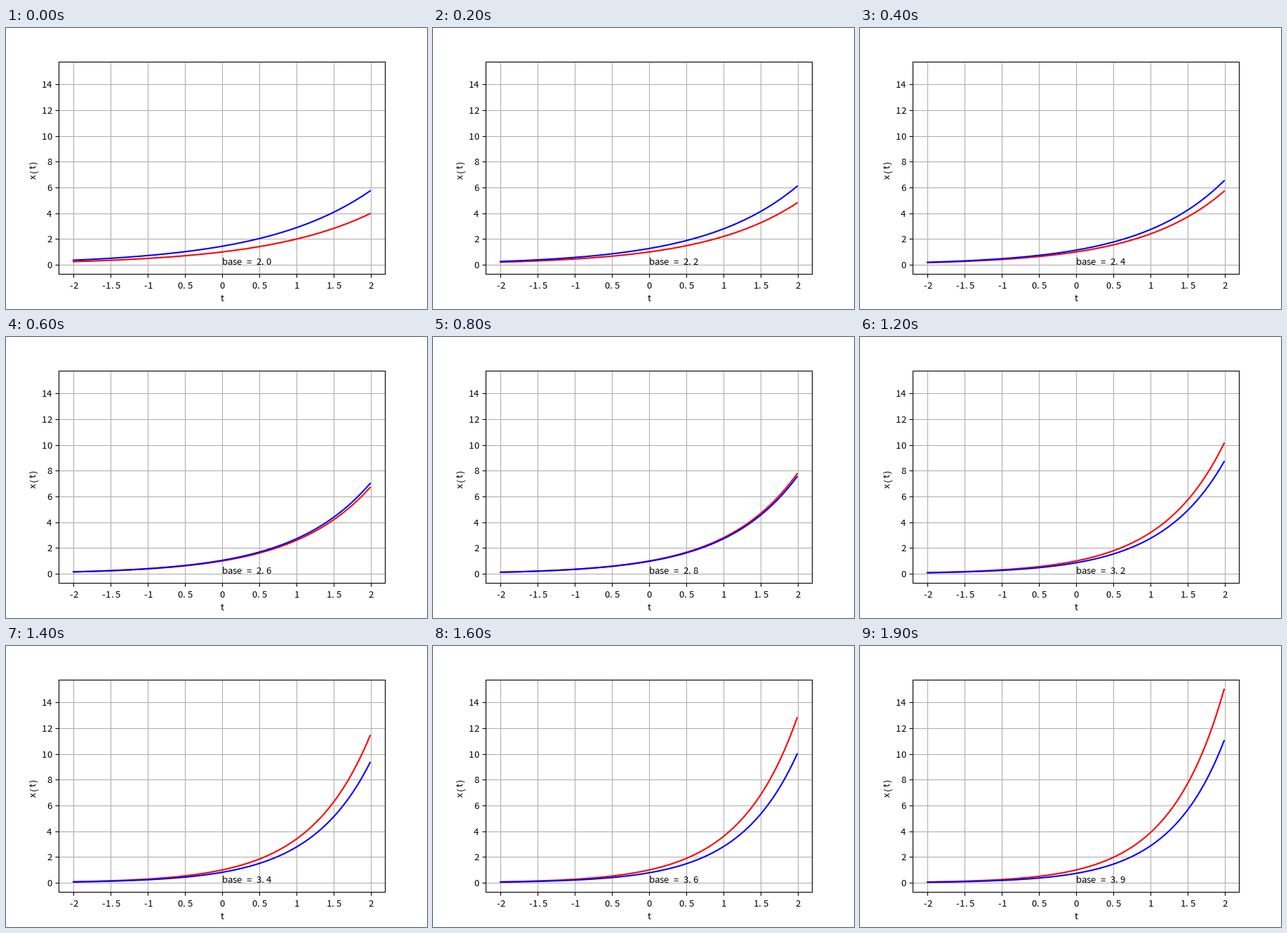
Write a matplotlib script that moves like this. It is 600 px wide and 400 px high and loops after 2000 ms.

```python
import numpy as np
import matplotlib.pyplot as plt
from matplotlib.animation import FuncAnimation

W, H, DPI = 600, 400, 100
FRAMES, INTERVAL = 20, 100
FONT, SIZE = "Noto Sans CJK JP", 9.5
PITCH = 6.94                      # half-width cell of a 10 pt font, in pixels
NUDGE = {".": -1.2, "(": 1.2, ")": -1.2}

fig = plt.figure(figsize=(W / DPI, H / DPI), dpi=DPI, facecolor="white")
ax = fig.add_axes([0.125, 0.125, 0.775, 0.755])

t = np.arange(-2, 2, 0.01)


def power(base):
    return base ** t


def integral(base):
    return base ** t / np.log(base)


def base_at(i):
    return 2 + 0.1 * i


def padded(lo, hi):
    pad = 0.05 * (hi - lo)
    return lo - pad, hi + pad


def mono(x, y, text, align=0.5, upright=False):
    """Set text on a half-width grid; x, y is the baseline anchor in pixels."""
    chars = []
    for k, ch in enumerate(text):
        step = (k + 0.5 - align * len(text)) * PITCH + NUDGE.get(ch, 0)
        px, py = (x, y - step) if upright else (x + step, y)
        chars.append(fig.text(px / W, 1 - py / H, ch, family=FONT, size=SIZE,
                              ha="center", va="baseline",
                              rotation=90 if upright else 0,
                              rotation_mode="anchor"))
    return chars


def to_pixel(x, y):
    px, py = ax.transData.transform((x, y))
    return px, H - py


last = base_at(FRAMES - 1)
ax.set_xlim(*padded(t[0], t[-1]))
ax.set_ylim(*padded(integral(last)[0], power(last)[-1]))
ax.set_xticks(np.arange(-2, 2.5, 0.5))
ax.set_yticks(range(0, 15, 2))
ax.tick_params(labelbottom=False, labelleft=False)
ax.grid(True)

x_names = ["-2", "-1.5", "-1", "0.5", "0", "0.5", "1", "1.5", "2"]
for tick, name in zip(ax.get_xticks(), x_names):
    mono(to_pixel(tick, 0)[0], 371, name)
for tick in ax.get_yticks():
    mono(65.3, to_pixel(0, tick)[1] + 5, str(int(tick)), align=1)
mono(308, 389, "t")
mono(43, 201, "x(t)", upright=True)

red, = ax.plot(t, power(2), color="red")
blue, = ax.plot(t, integral(2), color="blue")
caption = mono(*to_pixel(0, 0), "base = 2.0", align=0)


def update(i):
    base = base_at(i)
    red.set_ydata(power(base))
    blue.set_ydata(integral(base))
    for char, ch in zip(caption, f"base = {base:.1f}"):
        char.set_text(ch)
    return [red, blue, *caption]


anim = FuncAnimation(fig, update, frames=FRAMES, interval=INTERVAL,
                     repeat=True, repeat_delay=0, blit=False)
plt.show()
```
